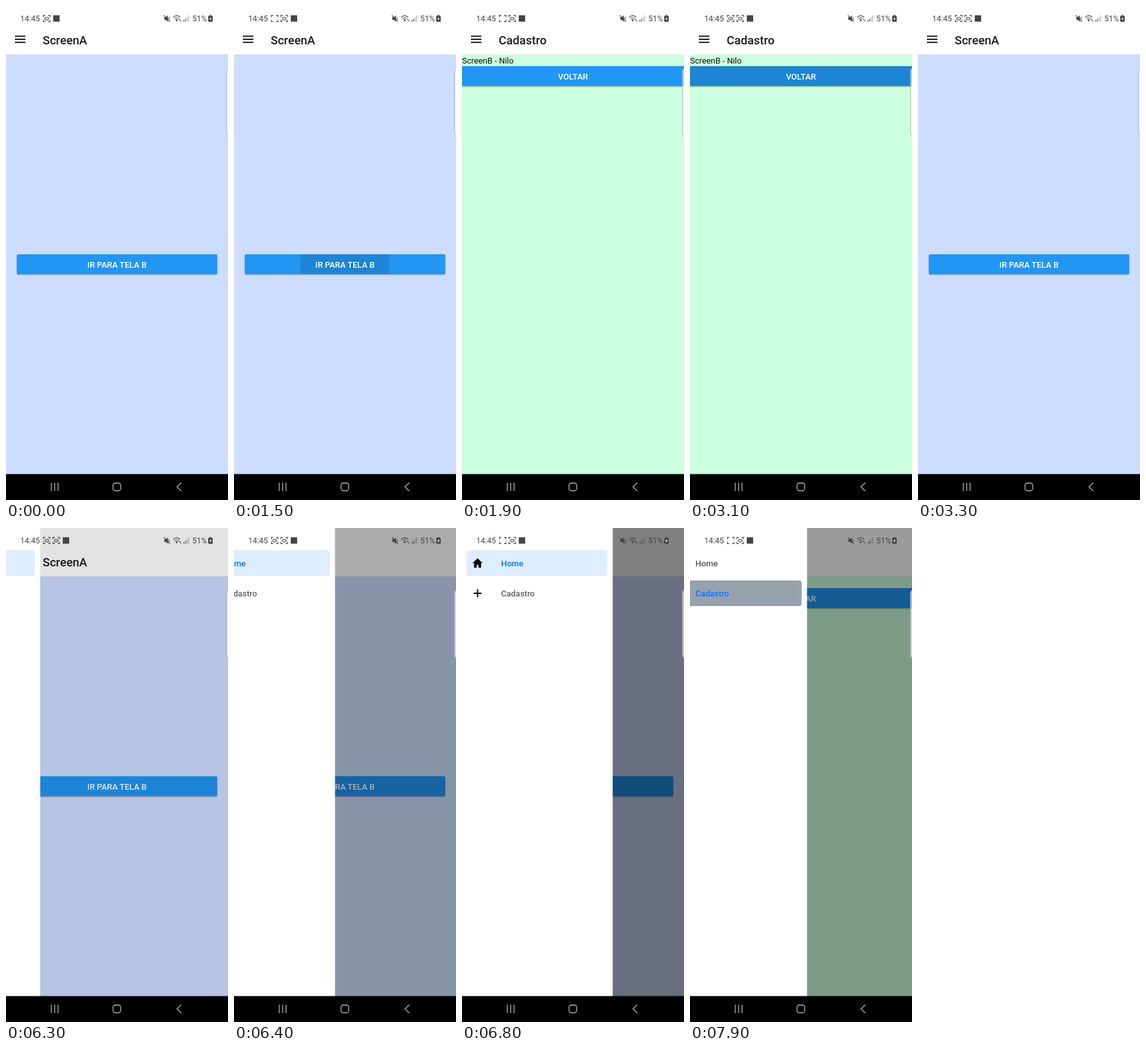
Recreate the animation shown at these times as an HTML page. Size 348 by 772 pixels, loop 8 s.

```html
<!DOCTYPE html>
<html lang="pt">
<head>
<meta charset="utf-8">
<style>
html, body { margin: 0; width: 100%; height: 100%; overflow: hidden; background: #000; }
svg { display: block; width: 348px; height: 772px; font: 500 13px Roboto, sans-serif; }
.bar { font: 400 12.4px Roboto, sans-serif; fill: #454545; }
.title { font-size: 18.5px; fill: #1c1c1e; }
.btn { fill: #2196f3; filter: drop-shadow(0 1px 1.3px rgba(0, 0, 0, .38)); }
.label { fill: #fff; text-anchor: middle; }
.line { fill: none; stroke: #454545; stroke-width: 1.1; }
.nav { fill: none; stroke: #b4b4b4; stroke-width: 1.3; }
</style>
</head>
<body>
<svg viewBox="0 0 348 772">
  <defs>
    <clipPath id="clipA"><rect x="17" y="388" width="314" height="31" rx="2"/></clipPath>
    <clipPath id="clipB"><rect y="94" width="348" height="31"/></clipPath>
    <path id="corners" class="line" d="M58.6 17.5v-2.900h2.900M66 14.600h2.900v2.900M68.900 21.500v2.900h-2.900M61.500 24.400h-2.900v-2.900"/>
    <g id="lens" class="line"><rect x="61" y="17.700" width="5.500" height="4" rx="1"/><path d="M63.200 19.700h1.200"/></g>
  </defs>

  <rect width="348" height="76" fill="#fff"/>
  <path d="M14 47.300h16.500M14 52h16.500M14 56.700h16.500" stroke="#1c1c1e" stroke-width="1.900"/>
  <text id="title" class="title" x="57.500" y="59.500"></text>

  <g id="screenA">
    <rect y="75.600" width="348" height="656.400" fill="#cdf"/>
    <rect class="btn" x="17" y="388" width="314" height="31" rx="2"/>
    <circle id="rippleA" cx="174" cy="404" clip-path="url(#clipA)"/>
    <text class="label" x="174" y="409">IR PARA TELA B</text>
  </g>
  <g id="screenB">
    <rect y="75.600" width="348" height="656.400" fill="#cfd"/>
    <text x="0" y="90" font-weight="400" fill="#111">ScreenB - Nilo</text>
    <rect class="btn" y="94" width="348" height="31" rx="1"/>
    <circle id="rippleB" cx="174" cy="110" clip-path="url(#clipB)"/>
    <text class="label" x="174" y="115">VOLTAR</text>
  </g>

  <rect id="shade" width="348" height="732"/>
  <g id="drawer">
    <rect width="237" height="732" fill="#fff"/>
    <rect id="active" x="8" width="220.500" height="40" rx="3.500" fill="#deedff"/>
    <rect id="press" x="8" y="82" width="220.500" height="40" rx="3.500" fill-opacity=".32"/>
    <path d="M25.200 47.300L17.300 55h2.400v7h4.100v-4.600h2.800V62h4.100v-7h2.400z"/>
    <path d="M19 102h12.400M25.200 95.800v12.400" stroke="#000" stroke-width="1.900"/>
    <text id="home" x="62" y="60">Home</text>
    <text id="form" x="62" y="107">Cadastro</text>
  </g>

  <path d="M350 97h-1.500q-3 1-3 5v96q0 4 3 6h1.500z" fill="#f4f5fa" fill-opacity=".65" stroke="#a5a9b3" stroke-width=".8"/>

  <g class="bar">
    <text x="22.300" y="24">14:45</text>
    <use href="#corners"/>
    <use id="blink" href="#lens"/>
    <g id="second" transform="translate(15)"><use href="#corners"/><use href="#lens"/></g>
    <rect id="app" y="14.500" width="10" height="10"/>
    <path d="M248 17.800h2.300l3.500-3v9.700l-3.500-3h-2.300z"/>
    <path class="line" d="M247.500 14.500l9.500 10M255.200 17.500q1.400 1.800 0 4" stroke-width="1.300"/>
    <path class="line" d="M262 17.500q5.500-4.800 11 0M264 19.800q3.500-3 7 0" stroke-width="1.400"/>
    <path d="M265.500 21.200q2-1.500 4 0l-2 3zM271 22l1.300-2 1.300 2zM272.500 22.500h2.600l-1.300 2z"/>
    <path class="line" d="M278.800 24.500v-2.500M281.300 24.500v-4.500" stroke-width="1.500"/>
    <path class="line" d="M283.800 24.500v-7M286.300 24.500v-10" stroke-width="1.200" opacity=".5"/>
    <text x="292" y="24">51%</text>
    <path d="M319 14.300h3v1h1q1 0 1 1v7.500q0 1-1 1h-5q-1 0-1-1v-7.500q0-1 1-1h1z"/>
    <path d="M321.300 17l-2.500 3.500h1.500l-.5 2.500 2.600-3.500h-1.600z" fill="#fff"/>
  </g>

  <rect y="731.500" width="348" height="41"/>
  <g class="nav">
    <path d="M71 745v13M76.300 745v13M81.600 745v13M274.800 745l-6.800 6.500 6.800 6.500"/>
    <rect x="167.700" y="745.500" width="12" height="12" rx="3.500"/>
  </g>
</svg>
<script>
const LOOP = 8000, STEP = 100, DRAWER = 237;
const el = id => document.getElementById(id);
const set = (id, attrs) => { for (const k in attrs) el(id).setAttribute(k, attrs[k]); };
const show = (id, on) => set(id, { visibility: on ? 'visible' : 'hidden' });

// Critically damped spring from 0 to 1
function spring(ms) {
  const x = Math.max(0, ms) * .014;
  return 1 - (1 + x) * Math.exp(-x);
}

// Touch feedback: spreads from the centre, then vanishes
function ripple(id, ms, length) {
  const on = ms >= 0 && ms < length;
  set(id, { r: on ? 70 + ms * 1.2 : 0, 'fill-opacity': .12 });
}

function draw(t) {
  const picked = t >= 7800;
  const onB = t >= 1900 && t < 3200 || picked;
  const open = spring(t - 6236) - spring(t - 7836);

  show('blink', t % 1000 < 500);
  show('second', t >= 100);
  set('app', { x: t >= 100 ? 89 : 74 });

  show('screenA', !onB);
  show('screenB', onB);
  el('title').textContent = onB ? 'Cadastro' : 'ScreenA';
  ripple('rippleA', t - 1500, 200);
  ripple('rippleB', t - 3000, 200);

  set('shade', { opacity: open / 2 });
  set('drawer', { transform: `translate(${DRAWER * (open - 1)})` });
  show('drawer', open > 0);
  set('active', { y: picked ? 82 : 35 });
  set('press', { opacity: picked ? 1 : 0 });
  set('home', { fill: picked ? '#555557' : '#007aff' });
  set('form', { fill: picked ? '#007aff' : '#606062' });
}

function tick() {
  const t = performance.now() % LOOP;
  draw(Math.floor(t / STEP) * STEP);
  requestAnimationFrame(tick);
}
tick();
</script>
</body>
</html>
```
